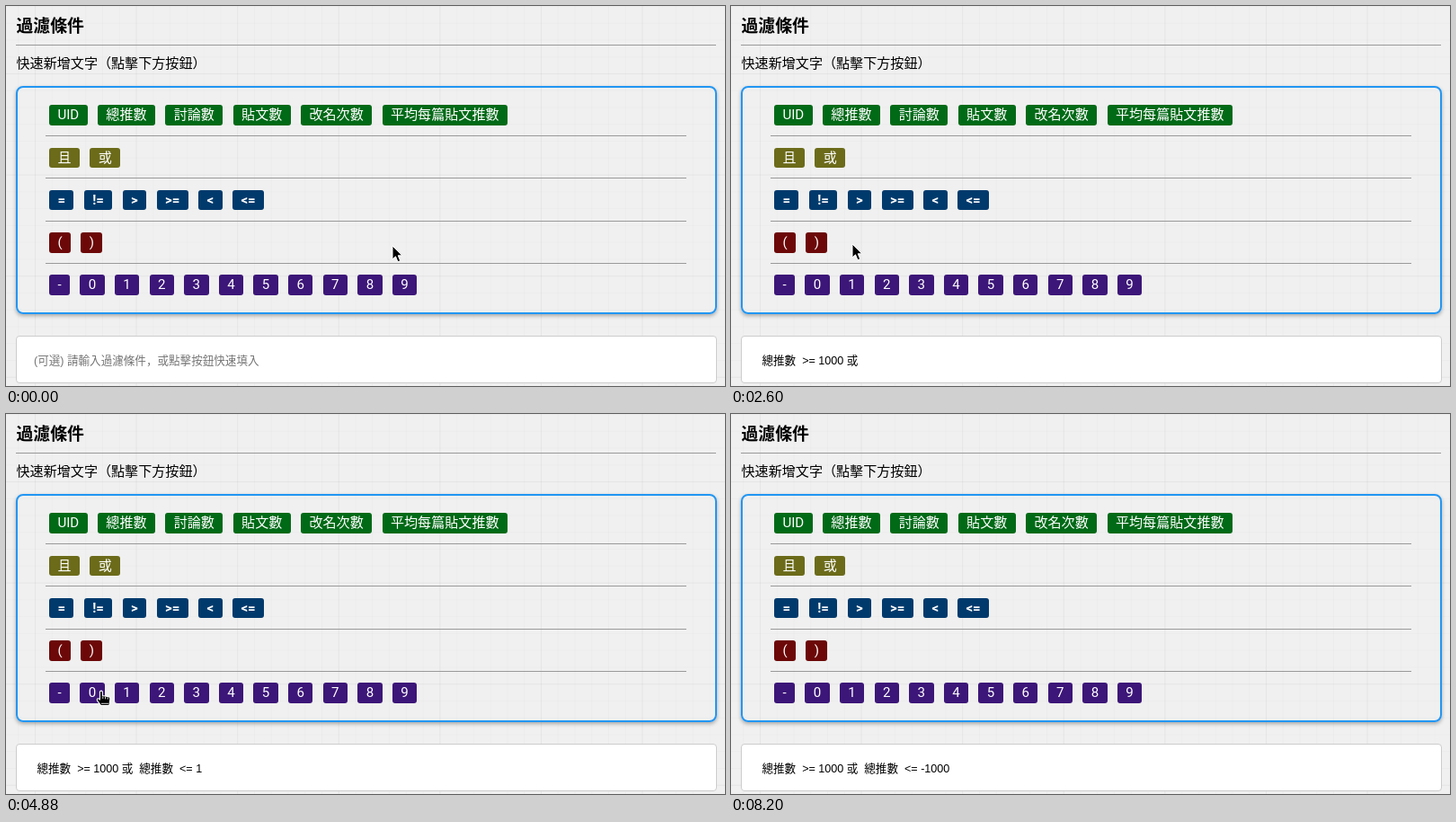
Recreate the animation shown at these times as an HTML page. Size 800x423 px, loop 8240 ms.

```html
<!DOCTYPE html>
<html>
<head>
<meta charset="utf-8">
<style>
html, body { margin: 0; width: 100%; height: 100%; overflow: hidden; }
body {
  position: relative; color: #000;
  font: 15.08px/23px Roboto, "Noto Sans CJK JP", "Noto Sans CJK", sans-serif;
  --fine: rgba(0,0,0,.015); --coarse: rgba(0,0,0,.03);
  background:
    linear-gradient(90deg, var(--coarse) 1px, transparent 1px) 32px 0 / 112.6px 100%,
    linear-gradient(var(--coarse) 1px, transparent 1px) 0 75px / 100% 112.6px,
    linear-gradient(90deg, var(--fine) 1px, transparent 1px) 32px 0 / 18.77px 100%,
    linear-gradient(var(--fine) 1px, transparent 1px) 0 75px / 100% 18.77px,
    #f0f0f0;
}
body > * { position: absolute; box-sizing: border-box; white-space: pre; }
h3 { margin: 0; left: 11.5px; top: 10px; font-size: 18.85px; line-height: 26px; }
#label { left: 11.5px; top: 53px; }
.rule { height: 1px; background: #999; }
#panel {
  left: 11px; top: 89px; width: 780px; height: 254px;
  border: 2px solid #2196f3; border-radius: 8px; box-shadow: 0 2px 4px rgba(0,0,0,.3);
}
.row { left: 48px; display: flex; gap: 11.31px; color: #fff; }
.row b { font-weight: inherit; padding: 0 9.43px; border-radius: 3px; height: 22.7px; line-height: 22.7px; }
#field {
  left: 11px; top: 367px; width: 780px; height: 53px; padding-left: 19px;
  border: 1px solid #ccc; border-radius: 4px; background: #fff;
  font: 12.57px/55px "Liberation Sans", "Noto Sans CJK JP", "Noto Sans CJK", sans-serif;
}
#field.empty { color: #757575; }
#field.focus { outline: 2px solid #101010; outline-offset: -1px; }
#field.focus::after { content: ""; display: inline-block; width: 1px; height: 14px; background: #000; vertical-align: -2px; }
svg { left: 0; top: 0; width: 24px; height: 24px; overflow: visible; }
</style>
</head>
<body>
<h3>過濾條件</h3>
<div id="label">快速新增文字（點擊下方按鈕）</div>
<div id="panel"></div>
<div id="field"></div>
<svg id="pointer">
  <path id="arrow" d="M0 0V15L3.5 11.8L6 17.8L8.7 16.6L6.2 10.8H10.8Z" fill="#000" stroke="#fff"/>
  <g id="hand" stroke-linejoin="round" transform="translate(0 -1) scale(1.06)">
    <path d="M-1.5 1Q0-.8 1.3 1V5.2L8 6.3Q9.6 7 9.3 9L8.3 15.5H-.5L-4.4 10.2Q-4.8 8-3 8.2L-1.5 9.4Z" fill="#000" stroke="#fff"/>
    <path d="M1.7 6V8.5M4.3 6.4V8.8M6.8 7V9M0 13.5H7.5" fill="none" stroke="#fff" stroke-width=".8"/>
  </g>
  <path id="beam" d="M-3-7.5Q0-7.5 0-6Q0-7.5 3-7.5M0-6V6M-3 7.5Q0 7.5 0 6Q0 7.5 3 7.5" fill="none" stroke="#000" stroke-width="1.2"/>
</svg>
<script>
const LOOP = 8240, CLICK_GAP = 160, HOLD = 80, LEAD = 60;
const $ = id => document.getElementById(id);
const field = $('field'), pointer = $('pointer');
const buttons = {};

function add(className, style, parent = document.body, tag = 'div') {
  const el = document.createElement(tag);
  el.className = className;
  Object.assign(el.style, style);
  parent.insertBefore(el, parent === document.body ? pointer : null);
  return el;
}
const rule = (left, top, width) => add('rule', { left: left + 'px', top: top + 'px', width: width + 'px' });

rule(11, 43, 779);
[
  ['#006a17', 'UID 總推數 討論數 貼文數 改名次數 平均每篇貼文推數'],
  ['#6b6b1a', '且 或'],
  ['#003a6c', '= != > >= < <=', 600],
  ['#6c0808', '( )'],
  ['#3c1678', '- 0 1 2 3 4 5 6 7 8 9']
].forEach(([background, names, fontWeight = 400], i) => {
  const step = 47.25 * i;
  const row = add('row', { top: 110.3 + step + 'px', fontWeight });
  for (const name of names.split(' ')) {
    buttons[name] = add('', { background }, row, 'b');
    buttons[name].textContent = name;
  }
  if (i) rule(44, Math.floor(97.3 + step), 713);
});

// Each stop: time, button or free point, number of clicks on the button
const stops = [
  [0, [430, 267]], [900, '總推數'], [1240, '>='], [1500, '1'], [1680, '0', 3], [2280, '或'],
  [2600, [135, 265]], [3120, '總推數'], [3920, [154, 213]], [4320, '<='], [4700, '1'],
  [4880, [106, 309]], [5600, [224, 393]],
  [6200, '-'], [6520, '1'], [6840, '0', 3], [7560, [103, 291]], [8040, [164, 275]]
].map(([time, at, clicks = 1]) => ({ time, at, clicks }));
const FOCUS = 5600, ERASE = 5800, BLUR = 6140, HIDE = 8200;

function spot({ at }) {
  if (Array.isArray(at)) return at;
  const r = buttons[at].getBoundingClientRect();
  return [r.left + r.width / 2 + 1, r.top + r.height / 2 - 1];
}

// The pointer rests at a stop while clicking, then eases to the next one
function locate(t) {
  const i = stops.findLastIndex(s => s.time - LEAD <= t);
  const from = stops[i], to = stops[i + 1] || from;
  const leave = from.time + HOLD + CLICK_GAP * (from.clicks - 1);
  const u = Math.min(1, Math.max(0, (t - leave) / (to.time - LEAD - leave)));
  const ease = to === from ? 0 : u * u * (3 - 2 * u);
  const a = spot(from), b = spot(to);
  return a.map((v, k) => v + (b[k] - v) * ease);
}

function typed(t) {
  let text = '';
  for (const { time, at, clicks } of stops) {
    if (time === FOCUS && t >= ERASE) text = text.slice(0, -1);
    if (!buttons[at]) continue;
    const piece = /[\d-]/.test(at) ? at : ` ${at} `;
    for (let k = 0; k < clicks; k++) if (time + k * CLICK_GAP <= t) text += piece;
  }
  return text;
}

function inside(el, [x, y]) {
  const r = el.getBoundingClientRect();
  return x >= r.left && x <= r.right && y >= r.top && y <= r.bottom;
}

function draw(t) {
  const tip = locate(t);
  const over = Object.values(buttons).some(b => inside(b, tip));
  const shape = inside(field, tip) ? 'beam' : over ? 'hand' : 'arrow';
  for (const id of ['arrow', 'hand', 'beam']) $(id).style.display = id === shape ? '' : 'none';
  pointer.style.transform = `translate(${tip[0]}px, ${tip[1]}px)`;
  pointer.style.visibility = t < HIDE ? 'visible' : 'hidden';

  const text = typed(t);
  field.textContent = text || '(可選) 請輸入過濾條件，或點擊按鈕快速填入';
  field.classList.toggle('empty', !text);
  field.classList.toggle('focus', t >= FOCUS && t < BLUR);
}

function frame() {
  draw(performance.now() % LOOP);
  requestAnimationFrame(frame);
}
frame();
</script>
</body>
</html>
```
